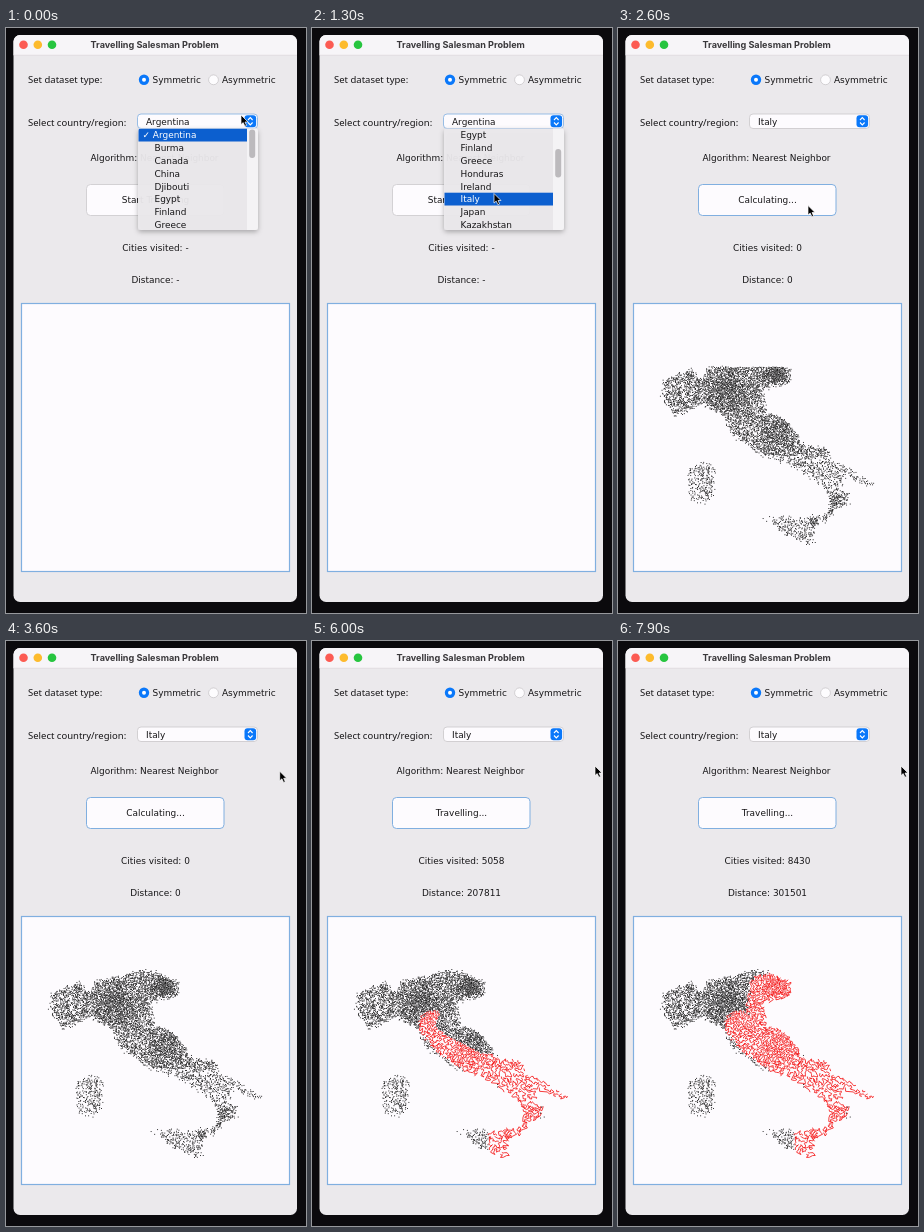
Animation, 300 px wide and 585 px high, one loop 8 s. Source, as an HTML page with a canvas:

```html
<!DOCTYPE html>
<html lang="en">
<head>
<meta charset="utf-8">
<title>Travelling Salesman Problem</title>
<style>
  html, body { margin: 0; width: 100%; height: 100%; overflow: hidden; background: #0b0a0d; }
  svg, canvas { position: absolute; left: 0; top: 0; width: 300px; height: 585px; }
  text { font: 8.95px "DejaVu Sans", sans-serif; fill: #161517; }
  .mid { text-anchor: middle; }
  .label { font: 9.5px "Noto Sans", sans-serif; }
  .title { font: 700 9.1px Inter, sans-serif; fill: #3a383b; }
</style>
</head>
<body>
<svg viewBox="0 0 300 585">
  <defs>
    <clipPath id="listClip"><rect x="132" y="100.5" width="120" height="101.5" rx="3"/></clipPath>
    <filter id="shadow" x="-20%" y="-20%" width="140%" height="150%">
      <feDropShadow dx="0" dy="2" stdDeviation="2.5" flood-opacity=".3"/>
    </filter>
  </defs>
  <rect x="7.5" y="7" width="283.5" height="567" rx="6.5" fill="#ebe9ec"/>
  <path d="M7.5 27V13.5A6.5 6.5 0 0 1 14 7H284.5A6.5 6.5 0 0 1 291 13.5V27Z" fill="#f7f5f8"/>
  <path d="M7.5 27.2H291" stroke="#d8d6d9" stroke-width=".6"/>
  <circle cx="17.5" cy="16.8" r="4.3" fill="#fc5b53"/>
  <circle cx="31.8" cy="16.8" r="4.3" fill="#fdbb2d"/>
  <circle cx="46" cy="16.8" r="4.3" fill="#27c53f"/>
  <text class="mid title" x="148.7" y="20">Travelling Salesman Problem</text>

  <text class="label" x="22" y="55">Set dataset type:</text>
  <circle cx="138" cy="51.8" r="5.2" fill="#0a78fa"/>
  <circle cx="138" cy="51.8" r="2" fill="#fff"/>
  <text x="146.5" y="55">Symmetric</text>
  <circle cx="207.5" cy="51.8" r="4.9" fill="#fdfcfe" stroke="#c4c2c5" stroke-width=".7"/>
  <text x="216" y="55">Asymmetric</text>

  <text class="label" x="22" y="97.5">Select country/region:</text>
  <rect id="combo" x="131.5" y="86" width="120" height="14.5" rx="3.5" fill="#fdfbfe" stroke-width=".8"/>
  <rect x="238.5" y="87.2" width="11.6" height="12" rx="3" fill="#0a78fa"/>
  <path d="M242 92L244.3 89.6L246.6 92M242 94.5L244.3 96.9L246.6 94.5" fill="none" stroke="#fff" stroke-width="1.1"/>
  <text id="country" x="140" y="97"></text>

  <text class="mid" x="148.5" y="133">Algorithm: Nearest Neighbor</text>
  <rect id="button" x="80.5" y="156.5" width="137.5" height="31" rx="4" fill="#fdfbfe"/>
  <text id="action" class="mid" x="149.5" y="174.8"></text>
  <text id="cities" class="mid" x="149.5" y="223"></text>
  <text id="distance" class="mid" x="149.5" y="255"></text>
  <rect x="15.5" y="275.5" width="268" height="268" fill="#fdfbfe" stroke="#80afe0" stroke-width="1.2"/>

  <g id="popup">
    <rect x="132" y="100.5" width="120" height="101.5" rx="3" fill="#ebe9ec" fill-opacity=".94" filter="url(#shadow)"/>
    <g clip-path="url(#listClip)">
      <rect x="241" y="100" width="11" height="103" fill="#f4f3f5"/>
      <rect id="hilite" x="132.5" width="108.5" height="12.8" fill="#0c5fcf"/>
      <g id="list"></g>
      <rect id="thumb" x="243.2" width="6" height="28.5" rx="3" fill="#bcbabd"/>
    </g>
  </g>
  <path id="cursor" d="M0 0V9.6L2.2 7.6L3.9 11.2L5.6 10.4L4 7H7Z" fill="#000" stroke="#fff" stroke-width=".7"/>
</svg>
<canvas id="map" width="300" height="585"></canvas>

<script>
const $ = id => document.getElementById(id);
const LOOP = 8000, STEP = 100, BATCH = 281, ROW = 12.8;
const lerp = (a, b, k) => a + (b - a) * k;
const clamp = (v, lo = 0, hi = 1) => Math.min(hi, Math.max(lo, v));

// Piecewise linear track; rows are [key, value, value...]
function track(rows, k) {
  const i = clamp(rows.findIndex(r => r[0] > k), -1, rows.length);
  if (i < 0) return rows[rows.length - 1].slice(1);
  const [key, ...from] = rows[Math.max(0, i - 1)];
  return from.map((v, j) => lerp(v, rows[i][j + 1], (k - key) / (rows[i][0] - key || 1)));
}

const cursorPath = [[0, 235, 87], [300, 210, 144], [1000, 210, 144], [1300, 182, 165.5],
  [1600, 182, 165.5], [2100, 190, 177.5], [2700, 190, 177.5], [3700, 283, 125]];
const distancePath = [[0, 0], [1686, 67780], [5058, 207811], [8430, 301501]];

const names = ["Argentina", "Burma", "Canada", "China", "Djibouti", "Egypt", "Finland",
  "Greece", "Honduras", "Ireland", "Italy", "Japan", "Kazakhstan"];
const items = names.map((name, i) => {
  const el = document.createElementNS("http://www.w3.org/2000/svg", "text");
  el.setAttribute("x", i ? 148.5 : 136.5);
  el.setAttribute("y", 110.3 + i * ROW);
  el.textContent = i ? name : "✓ " + name;
  return $("list").appendChild(el);
});

// Key points of the coasts; scattered towns roughen the edges
const land = new Path2D(`M57 388L84 376L107 387L112 403L128 418L158 433L172 436L184 446L206 457
  L214 478L205 490L206 496L221 478L231 476L231 467L220 460L228 448L252 460L256 455L211 430L209 421
  L187 418L168 393L148 384L144 361L171 355L172 341L141 329L92 340L83 352L73 342L48 351L43 365Z
  M147 491L162 488L184 491L204 487L195 502L195 517L170 508Z
  M70 440L88 434L97 442L95 470L85 477L74 474Z`);

// Crowded areas: x, y, extra density, radius
const crowds = [[110, 362, .4, 22], [158, 345, .6, 12], [160, 405, .3, 18],
  [215, 477, .5, 12], [198, 493, .5, 8]];

// Backbone of the tour: x, y, cities visited on arrival
const tour = [[190, 512, 0], [192, 495, 300], [210, 488, 700], [215, 465, 1200], [200, 442, 1500],
  [228, 443, 1690], [255, 457, 2200], [215, 431, 2500], [180, 430, 3300], [135, 400, 4600],
  [122, 385, 5050], [170, 403, 5400], [150, 385, 5900], [144, 365, 6700], [147, 348, 7200], [174, 346, 8420]];

let seed = 16862;
function rnd() {
  seed = seed + 0x6D2B79F5 | 0;
  let t = Math.imul(seed ^ seed >>> 15, 1 | seed);
  t = t + Math.imul(t ^ t >>> 7, 61 | t) ^ t;
  return ((t ^ t >>> 14) >>> 0) / 4294967296;
}
const spread = size => (rnd() - .5) * size;

const ctx = $("map").getContext("2d");

// When the tour reaches a town, or Infinity if it lies too far off
function visitKey(x, y) {
  let key = Infinity, min = 13 + rnd() * 4;
  for (let i = 1; i < tour.length; i++) {
    const [ax, ay, from] = tour[i - 1], [bx, by, to] = tour[i];
    const dx = bx - ax, dy = by - ay;
    const k = clamp(((x - ax) * dx + (y - ay) * dy) / (dx * dx + dy * dy));
    const d = Math.hypot(x - ax - dx * k, y - ay - dy * k);
    if (d < min) { min = d; key = lerp(from, to, k); }
  }
  return key;
}

function density(x, y) {
  const base = y > 428 ? .27 : .45;
  return crowds.reduce((sum, [cx, cy, amp, r]) =>
    sum + amp * Math.exp(-((x - cx) ** 2 + (y - cy) ** 2) / (r * r)), base);
}

// Towns from south to north
function makeTowns() {
  const towns = [];
  for (let row = 519; row > 326; row--) for (let col = 38; col < 260; col++) {
    const x = col + rnd(), y = row + rnd();
    if (!ctx.isPointInPath(land, x + spread(5), y + spread(5))) continue;
    if (rnd() < density(x, y)) towns.push({ x, y, key: visitKey(x, y) });
  }
  return towns;
}

// Nearest-neighbour walk through each batch of towns
function walk(batch) {
  const path = new Path2D(), left = [...batch];
  let at = left.pop();
  while (left.length) {
    let best = 0, min = Infinity;
    left.forEach((p, i) => {
      const d = (p.x - at.x) ** 2 + (p.y - at.y) ** 2;
      if (d < min) { min = d; best = i; }
    });
    const [next] = left.splice(best, 1);
    if (min < 64) {
      path.moveTo(at.x, at.y);
      path.lineTo(next.x, next.y);
    }
    at = next;
  }
  return path;
}

const towns = makeTowns();
const route = Array.from({ length: 30 }, (_, i) =>
  walk(towns.filter(p => Math.floor(p.key / BATCH) === i)));

function batchesAt(t) {
  if (t <= 6100) return Math.max(0, (t - 4200) / STEP);
  return 19 + Math.round(clamp((t - 6600) / 1300) * 11);
}

function drawMap(t, done) {
  ctx.clearRect(0, 0, 300, 585);
  const shown = towns.length * clamp((t - 2200) / 415);
  ctx.fillStyle = "#050505";
  for (let i = 0; i < shown; i++) {
    const p = towns[i];
    if (p.key >= done * BATCH) ctx.fillRect(p.x - .45, p.y - .45, .9, .9);
  }
  ctx.strokeStyle = "#f40c0c";
  ctx.lineWidth = .8;
  route.slice(0, done).forEach(path => ctx.stroke(path));
}

function drawPopup(t, y) {
  const open = t < 1500;
  $("popup").style.display = open ? "" : "none";
  $("combo").setAttribute("stroke", open ? "#80afe0" : "#c9c7ca");
  if (!open) return;
  const scroll = Math.round(5 * clamp((t - 200) / 400));
  const picked = t < 200 ? 0 : t > 1000 ? scroll + Math.floor((y - 100.7) / ROW) : -1;
  $("list").setAttribute("transform", `translate(0 ${-scroll * ROW})`);
  $("thumb").setAttribute("y", 101.5 + scroll * 3.9);
  $("hilite").style.display = picked < 0 ? "none" : "";
  $("hilite").setAttribute("y", 100.7 + (picked - scroll) * ROW);
  items.forEach((el, i) => el.style.fill = i === picked ? "#fff" : "");
}

function draw(t) {
  const [x, y] = track(cursorPath, t), done = batchesAt(t), started = t >= 2200;
  const count = done * BATCH;
  $("cursor").setAttribute("transform", `translate(${x} ${y})`);
  drawPopup(t, y);
  $("country").textContent = t < 1500 ? "Argentina" : "Italy";
  $("action").textContent = !started ? "Start Travelling" : t < 4200 ? "Calculating..." : "Travelling...";
  $("button").setAttribute("stroke", started ? "#80afe0" : "#d3d1d4");
  $("cities").textContent = "Cities visited: " + (started ? count : "-");
  $("distance").textContent = "Distance: " + (started ? Math.round(track(distancePath, count)[0]) : "-");
  drawMap(t, done);
}

let last = -1;
const origin = performance.now();
function tick() {
  const t = Math.floor((performance.now() - origin) % LOOP / STEP) * STEP;
  if (t !== last) draw(last = t);
  requestAnimationFrame(tick);
}
tick();
</script>
</body>
</html>
```
